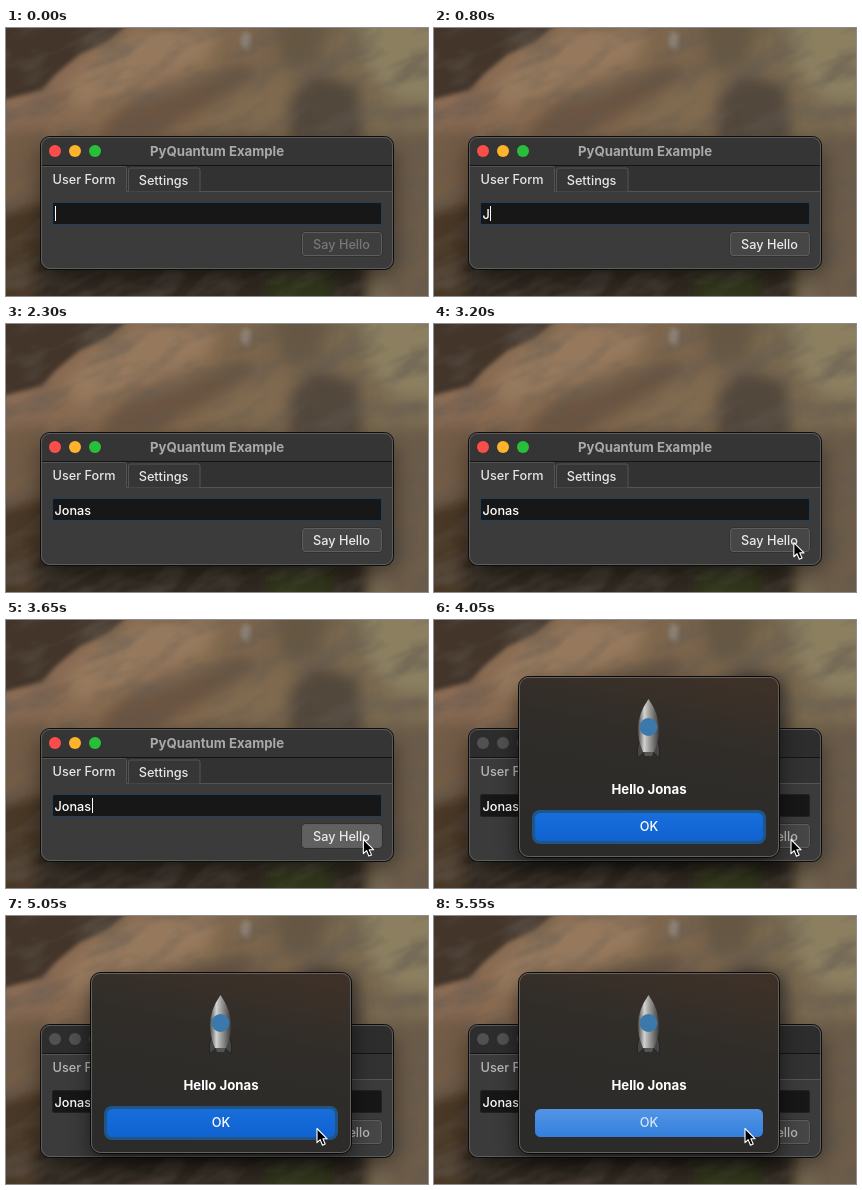
Animation of 422x268 px, one loop 5.6 s. Source, as an HTML page:

```html
<!DOCTYPE html>
<html lang="en">
<head>
<meta charset="utf-8">
<title>Greeting form</title>
<style>
  html, body { margin: 0; width: 100%; height: 100%; overflow: hidden; background: #4c4035; }
  svg { display: block; width: 100vw; height: 100vh; }
  text { font: 500 12.7px Inter, "Liberation Sans", sans-serif; fill: #e6e6e6; }
  .bold { font-weight: 700; font-size: 13.2px; }
  .mid { text-anchor: middle; }
</style>
</head>
<body>
<svg viewBox="0 0 422 268">
  <defs>
    <filter id="soft" x="-30%" y="-30%" width="160%" height="160%"><feGaussianBlur stdDeviation="7"/></filter>
    <filter id="crisp" x="-30%" y="-30%" width="160%" height="160%"><feGaussianBlur stdDeviation="2"/></filter>
    <filter id="shade" x="-30%" y="-40%" width="160%" height="190%"><feGaussianBlur stdDeviation="11"/></filter>
    <filter id="grain" x="0" y="0" width="100%" height="100%">
      <feTurbulence type="fractalNoise" baseFrequency=".022 .05" numOctaves="3" seed="8"/>
      <feColorMatrix values="0 0 0 0 .12  0 0 0 0 .1  0 0 0 0 .08  2.4 0 0 0 -1"/>
    </filter>
    <linearGradient id="rock" x1="0" y1="0" x2="1" y2="0">
      <stop offset="0" stop-color="#8a6c53"/>
      <stop offset=".4" stop-color="#84694f"/>
      <stop offset=".65" stop-color="#76634c"/>
      <stop offset="1" stop-color="#7c6f55"/>
    </linearGradient>
    <linearGradient id="panel" x1=".7" y1="0" x2=".4" y2="1">
      <stop offset="0" stop-color="#3d3128"/>
      <stop offset=".35" stop-color="#302d29"/>
      <stop offset="1" stop-color="#2b2b2a"/>
    </linearGradient>
    <linearGradient id="metal">
      <stop offset="0" stop-color="#4c4c4c"/>
      <stop offset=".3" stop-color="#d2d2d0"/>
      <stop offset=".55" stop-color="#9a9a98"/>
      <stop offset="1" stop-color="#3d3d3d"/>
    </linearGradient>
    <linearGradient id="blue" x1="0" y1="0" x2="0" y2="1">
      <stop offset="0" stop-color="#176edb"/>
      <stop offset="1" stop-color="#1062cf"/>
    </linearGradient>
    <linearGradient id="bluePressed" x1="0" y1="0" x2="0" y2="1">
      <stop offset="0" stop-color="#5295e6"/>
      <stop offset="1" stop-color="#347fdd"/>
    </linearGradient>
  </defs>

  <g id="backdrop">
    <rect width="422" height="268" fill="#43352a"/>
    <path filter="url(#crisp)" fill="url(#rock)"
      d="M-20 76 L8 69 L36 62 L50 46 L74 26 L102 13 L122 -4 L130 -20 H450 V290 H-20Z"/>
    <g filter="url(#soft)">
      <path fill="#96795d" d="M60 58 L92 26 L140 2 L214 0 L200 34 L130 60 L70 82Z"/>
      <path fill="#5c4a39" opacity=".65" d="M88 108 L118 78 L168 64 L236 36 L252 46 L196 82 L150 108Z"/>
      <path fill="#806a50" d="M196 100 L240 62 L284 46 L272 108Z"/>
      <path fill="#4e443a" opacity=".85" d="M284 112 L284 72 L308 46 L352 58 L356 112Z"/>
      <path fill="#5d503e" opacity=".6" d="M262 -20 H326 L312 36 L280 40Z"/>
      <path fill="#8b7f60" d="M350 -20 H450 V72 H392 L362 44Z"/>
      <path fill="#735b45" d="M-20 108 L38 100 V172 L-20 182Z"/>
      <path fill="#4a3828" d="M-20 184 L45 172 V290 H-20Z"/>
      <path fill="#322b20" d="M30 230 H360 V290 H30Z"/>
      <path fill="#35411f" opacity=".6" d="M262 246 H326 V280 H262Z"/>
      <path fill="#6c5c48" d="M386 104 H450 V290 H382Z"/>
    </g>
    <ellipse cx="240" cy="13" rx="5" ry="9" fill="#a09a92" opacity=".75" filter="url(#crisp)"/>
    <rect x="-100" y="-100" width="640" height="480" transform="rotate(-24 211 134)" opacity=".5" filter="url(#grain)"/>
  </g>

  <g id="window">
    <rect x="35" y="117" width="352" height="132" rx="12" fill="#000" opacity=".5" filter="url(#shade)"/>
    <rect x="34.5" y="108.5" width="353" height="133" rx="9" fill="#3b3b3b" stroke="#0c0c0c"/>
    <path id="titlebar" d="M35 137 V118 Q35 109 44 109 H378 Q387 109 387 118 V137Z"/>
    <path fill="#323232" d="M35 137 H387 V163 H35Z"/>
    <path fill="#141414" d="M35 137 H387 V138 H35Z"/>
    <path fill="#3b3b3b" d="M36 139 H120 V166 H36Z"/>
    <path fill="none" stroke="#545454" d="M35.5 138.5 H118.5 Q120.5 138.5 120.5 140.5 V163.5 H386"/>
    <path fill="#363636" stroke="#545454" d="M122.5 163.5 V142 Q122.5 140 124.5 140 H192 Q194 140 194 142 V163.5"/>
    <rect x="35.5" y="109.5" width="351" height="131" rx="8.5" fill="none" stroke="#686868" stroke-opacity=".75"/>
    <g id="lights"><circle cx="49" cy="123" r="6"/><circle cx="69" cy="123" r="6"/><circle cx="89" cy="123" r="6"/></g>
    <text id="title" class="bold mid" x="211" y="127.6">PyQuantum Example</text>
    <text id="tab" x="46.5" y="156">User Form</text>
    <text x="132.7" y="157">Settings</text>
    <rect id="field" x="46.5" y="174.5" width="329" height="22" rx="1.5" fill="#171717"/>
    <text id="entry" x="48.5" y="191" style="fill:#fff"></text>
    <rect id="caret" y="178" width="1" height="15" fill="#fff"/>
    <rect x="295.5" y="203.5" width="81" height="25" rx="3.5" fill="#2a2a2a"/>
    <rect id="hello" x="296.5" y="204.5" width="79" height="23" rx="2.5" stroke="#5d5d5d"/>
    <text id="helloText" class="mid" x="335.5" y="221">Say Hello</text>
  </g>

  <g id="dialog">
    <rect x="85" y="66" width="260" height="180" rx="12" fill="#000" opacity=".55" filter="url(#shade)"/>
    <rect x="84.5" y="56.5" width="261" height="181" rx="10" fill="url(#panel)" stroke="#090909"/>
    <rect x="85.5" y="57.5" width="259" height="179" rx="9" fill="none" stroke="#64605c"/>
    <path fill="#464646" stroke="#191919" stroke-width=".6" d="M207 119 Q202 126 204 138 L210 132 H219 L225 138 Q227 126 222 119Z"/>
    <path fill="#555" d="M209 130 H220 L218 136 H211Z"/>
    <path fill="url(#metal)" d="M214.5 79 Q204 94 204 109 Q204 121 209 132 H220 Q225 121 225 109 Q225 94 214.5 79Z"/>
    <circle cx="214.5" cy="107" r="9" fill="#3b78ab"/>
    <text id="greeting" class="bold mid" x="215" y="174" style="fill:#fff"></text>
    <rect id="ring" x="98" y="190" width="234" height="34" rx="8" fill="#1f5687"/>
    <rect id="ok" x="101" y="193" width="228" height="28" rx="5.5"/>
    <text id="okText" class="mid" x="215" y="211.3">OK</text>
  </g>

  <path id="pointer" fill="#000" stroke="#fff" stroke-width="1.1" stroke-linejoin="round"
    d="M0 0 V14.2 L3.2 11.2 L5.5 16.7 L8.2 15.5 L5.9 10.3 H10.2Z"/>
</svg>

<script>
const LOOP = 5600;
const NAME = "Jonas";
const TYPE_START = 800, KEY_GAP = 140;
const TYPE_END = TYPE_START + KEY_GAP * (NAME.length - 1);
const DIALOG_AT = 3700, OK_AT = 5400;
// Pointer stops: time, x, y
const PATH = [[2550, 424, 262], [3100, 360, 218.5], [3800, 357, 219.5], [4250, 357, 219.5], [4900, 311, 212.5]];

const el = id => document.getElementById(id);
const paint = (id, attrs) => { for (const key in attrs) el(id).setAttribute(key, attrs[key]); };
const show = (id, on) => paint(id, { visibility: on ? "visible" : "hidden" });
const color = (id, value) => { el(id).style.fill = value; };

function pointerAt(t) {
  const next = PATH.findIndex(stop => stop[0] > t);
  if (next <= 0) return PATH[next < 0 ? PATH.length - 1 : 0].slice(1);
  const [t0, x0, y0] = PATH[next - 1], [t1, x1, y1] = PATH[next];
  const u = (t - t0) / (t1 - t0), k = u * u * (3 - 2 * u);
  return [x0 + (x1 - x0) * k, y0 + (y1 - y0) * k];
}

function caretVisible(t) {
  if (t >= DIALOG_AT) return false;
  if (t < TYPE_START) return t < 500;
  return t < TYPE_END || Math.floor((t - TYPE_END) / 500) % 2 === 0;
}

function update(t) {
  const active = t < DIALOG_AT;
  const count = t < TYPE_START ? 0 : Math.min(NAME.length, 1 + Math.floor((t - TYPE_START) / KEY_GAP));
  const pressed = t >= OK_AT;

  el("entry").textContent = NAME.slice(0, count);
  paint("caret", { x: Math.round(49 + (count ? el("entry").getComputedTextLength() : 0)) });
  show("caret", caretVisible(t));

  paint("titlebar", { fill: active ? "#363535" : "#2d2d2d" });
  paint("field", { stroke: active ? "#20405e" : "#222" });
  [...el("lights").children].forEach((light, i) =>
    light.setAttribute("fill", active ? ["#fb4e4b", "#fdb32b", "#28c03a"][i] : "#515151"));
  color("title", active ? "#a9a9a9" : "#707070");
  color("tab", active ? "#e6e6e6" : "#b9b9b9");
  paint("hello", { fill: !count ? "#3e3e3e" : t > 3580 && active ? "#606060" : "#464646" });
  color("helloText", !count ? "#777" : active ? "#e9e9e9" : "#bcbcbc");

  show("dialog", !active);
  show("ring", !active && !pressed);
  paint("ok", { fill: pressed ? "url(#bluePressed)" : "url(#blue)" });
  color("okText", pressed ? "#d9e6f7" : "#fff");

  const [x, y] = pointerAt(t);
  paint("pointer", { transform: `translate(${x} ${y})` });
  show("pointer", t >= PATH[0][0]);
}

el("greeting").textContent = "Hello " + NAME;
const start = performance.now();
function frame() {
  update((performance.now() - start) % LOOP);
  requestAnimationFrame(frame);
}
frame();
</script>
</body>
</html>
```
